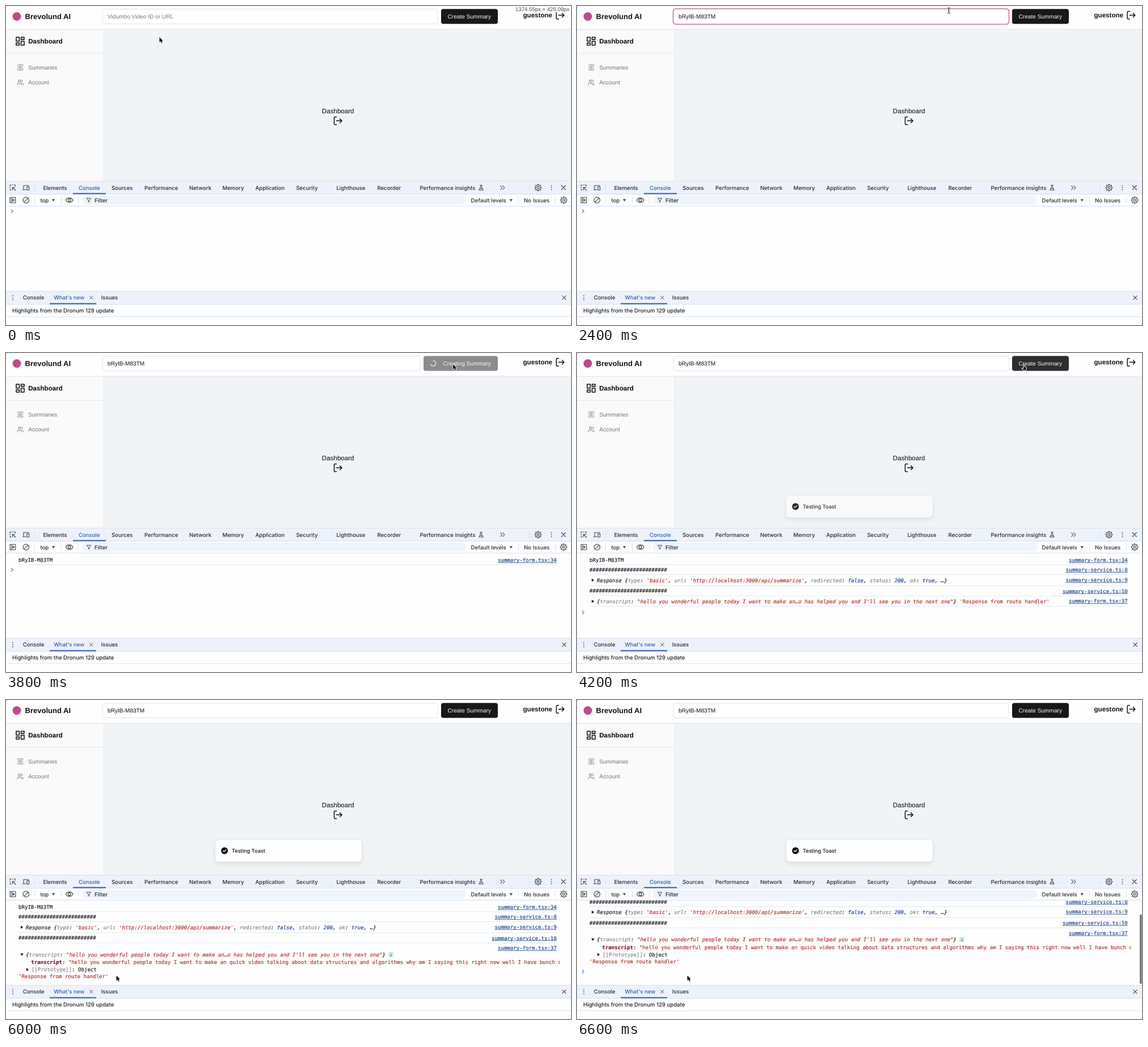
Animation of 996x562 px, one loop 7 s. Source, as an HTML page with a canvas:

```html
<!DOCTYPE html>
<html lang="en">
<head>
<meta charset="utf-8">
<title>Summary dashboard</title>
<style>
html, body { margin: 0; width: 100%; height: 100%; overflow: hidden; background: #fefefe; }
canvas { display: block; width: 996px; height: 562px; }
</style>
</head>
<body>
<canvas id="stage" width="996" height="562"></canvas>
<script>
const ctx = document.getElementById('stage').getContext('2d');
ctx.textRendering = 'geometricPrecision';
const LOOP = 7000, STEP = 200;
const SANS = '"Liberation Sans", Arial, sans-serif';
const UI = 'Inter, sans-serif';
const MONO = '9.085px "DejaVu Sans Mono", monospace';
const INK = '#1f1f1f', ICON = '#45484c', BLUE = '#2a5cc2', RED = '#b8302a', GREY = '#85868a', NUM = '#1f3da8';
const LINK = '#1f4696';
const VIDEO = 'bRyIB-M83TM';

// Event times in ms
const T = { label: 800, focus: 600, paste: 1800, submit: 3000, reply: 3950, expand: 5600, scroll: 6200 };

const clamp = v => Math.max(0, Math.min(1, v));
const smooth = v => v * v * (3 - 2 * v);

function rect(x, y, w, h, color) {
  ctx.fillStyle = color;
  ctx.fillRect(x, y, w, h);
}

function round(x, y, w, h, r, fill, stroke, width = 1) {
  ctx.beginPath();
  ctx.roundRect(x, y, w, h, r);
  if (fill) { ctx.fillStyle = fill; ctx.fill(); }
  if (stroke) { ctx.strokeStyle = stroke; ctx.lineWidth = width; ctx.stroke(); }
}

function text(str, x, y, font, color = INK, align = 'left') {
  ctx.font = font;
  ctx.fillStyle = color;
  ctx.textAlign = align;
  ctx.fillText(str, x, y);
}

// Console text is slightly heavier than the regular weight.
function code(str, x, cy, color, style = '', align = 'left') {
  text(str, x, cy + 3.2, style + ' ' + MONO, color, align);
  ctx.strokeStyle = color;
  ctx.lineWidth = 0.2;
  ctx.strokeText(str, x, cy + 3.2);
}

const ui = (str, x, cy, color = '#27292c') => text(str, x + 0.4, cy + 3.5, '500 9.6px ' + UI, color);

// Draws an SVG path centred on (x, y); the path uses a 24-unit grid.
function icon(path, x, y, scale, color = ICON, weight = 2, filled = false) {
  ctx.save();
  ctx.translate(x - 12 * scale, y - 12 * scale);
  ctx.scale(scale, scale);
  ctx.lineWidth = weight;
  ctx.lineCap = ctx.lineJoin = 'round';
  ctx.strokeStyle = ctx.fillStyle = color;
  const shape = new Path2D(path);
  filled ? ctx.fill(shape) : ctx.stroke(shape);
  ctx.restore();
}

const ring = (x, y, r) => `M${x - r} ${y}a${r} ${r} 0 1 0 ${2 * r} 0a${r} ${r} 0 1 0 ${-2 * r} 0`;
const ICONS = {
  board: 'M3 3h7v9H3zM14 3h7v5h-7zM14 12h7v9h-7zM3 16h7v5H3z',
  view: 'M21 17v2a2 2 0 0 1-2 2H5a2 2 0 0 1-2-2v-2M21 7V5a2 2 0 0 0-2-2H5a2 2 0 0 0-2 2v2M5 12a7.5 7.5 0 0 1 14 0a7.5 7.5 0 0 1-14 0' + ring(12, 12, 1.5),
  users: 'M16 21v-2a4 4 0 0 0-4-4H6a4 4 0 0 0-4 4v2M22 21v-2a4 4 0 0 0-3-3.9M16 3.1a4 4 0 0 1 0 7.8' + ring(9, 7, 4),
  exit: 'M8 2H4a2 2 0 0 0-2 2v16a2 2 0 0 0 2 2h4M8 12h14M17 7l5 5-5 5',
  inspect: 'M3 7V3h3M10 3h2M16 3h4v4M3 11v2M3 17v3h4M21 21l-9-9M11 19v-8h8',
  device: 'M4 17V5h17M1 19h11M15 9h7v11h-7z',
  panel: 'M3 3h18v18H3zM8 3v18M12 8l5 4-5 4z',
  clear: ring(12, 12, 9.5) + 'M18.5 5.5l-13 13',
  eye: 'M1 12C5 3 19 3 23 12C19 21 5 21 1 12' + ring(12, 12, 4),
  funnel: 'M3 4h18l-7 9v7h-4v-7z',
  flask: 'M8 3h8M10 3v7L4 21h16L14 10V3M7 16h10',
  cross: 'M5 5l14 14M19 5L5 19',
  more: 'M4 5l7 7-7 7M13 5l7 7-7 7',
  down: 'M4 6h16l-8 13z',
  right: 'M6 4v16l13-8z',
  check: 'M6 12l4 4 8-8',
  prompt: 'M8 5l7 7-7 7',
  dots: ring(12, 4, 2) + ring(12, 12, 2) + ring(12, 20, 2)
};

function gear(x, y) {
  let path = '';
  for (let i = 0; i < 32; i++) {
    const a = (i - 0.5) * Math.PI / 16, r = i % 4 < 2 ? 11 : 8;
    path += `${i ? 'L' : 'M'}${12 + r * Math.cos(a)} ${12 + r * Math.sin(a)}`;
  }
  icon(path + 'Z' + ring(12, 12, 3.5), x, y, 0.53, ICON, 2.2);
}

function pointerAt(t) {
  const keys = [[0, 270.5, 55], [600, 262, 18], [1400, 262, 18], [2400, 655.5, 8], [2800, 788, 20],
    [4400, 788, 20], [5400, 29.5, 441], [5600, 29.5, 441], [6000, 194.5, 485.5], [LOOP, 194.5, 485.5]];
  const i = keys.findIndex(k => k[0] > t);
  const [t0, x0, y0] = keys[i - 1], [t1, x1, y1] = keys[i];
  const p = smooth((t - t0) / (t1 - t0));
  return { x: x0 + (x1 - x0) * p, y: y0 + (y1 - y0) * p };
}

const inBox = (p, x0, x1) => p.x > x0 && p.x < x1 && p.y > 5 && p.y < 32;

function drawPage(t, mouse, busy) {
  rect(0, 0, 996, 308, '#fefefe');
  rect(173, 41, 823, 267, '#f1f4f6');
  rect(0, 41, 172, 267, '#fafafa');
  rect(172, 41, 1, 267, '#e6e8eb');
  rect(0, 83, 172, 1, '#e6e8eb');
  rect(0, 40, 996, 1, '#eff1f3');
  rect(0, 41, 996, 1, '#e9ebee');

  ctx.beginPath();
  ctx.arc(19, 18.5, 7.5, 0, 7);
  ctx.fillStyle = '#c0488c';
  ctx.fill();
  text('Brevolund AI', 33.5, 22.5, 'bold 13.04px ' + SANS, '#111');
  icon(ICONS.board, 25, 62, 0.78, '#111', 2);
  text('Dashboard', 39.2, 65.8, 'bold 11.6px ' + SANS, '#080808');
  icon(ICONS.view, 25.2, 108.3, 0.52, '#70747b', 1.7);
  icon(ICONS.users, 25.2, 134.5, 0.5, '#70747b', 2);
  text('Summaries', 39.2, 111.8, '10.14px ' + SANS, '#70747b');
  text('Account', 39.2, 137.8, '10.14px ' + SANS, '#70747b');
  text('Dashboard', 585.2, 188.6, '11.6px ' + SANS, '#080808', 'center');
  icon(ICONS.exit, 585.3, 202.3, 0.68, '#111', 2.2);

  const right = busy ? 730 : 761;
  const focused = t >= T.focus && t < T.submit;
  if (focused) round(169.5, 4.8, 592, 27.4, 5, '#fff', '#bd558f', 1.3);
  else round(170, 5.5, right - 170, 26, 4, '#fff', '#e2e4e8');
  if (t < T.paste) text('Vidumbo Video ID or URL', 179, 21.7, '10.14px ' + SANS, '#777b83');
  else text(VIDEO, 179, 21.7, '10.14px ' + SANS, '#111');

  if (busy) {
    round(736, 5.3, 131, 26.3, 4, '#8c8c8d');
    text('Creating Summary', 770.5, 21.7, '10.14px ' + SANS, '#f7f7f7');
    const a = (t - 3200) / 1000 * Math.PI * 2;
    ctx.beginPath();
    ctx.arc(753, 18.3, 4.7, a + 0.9, a + 5.3);
    ctx.strokeStyle = '#f4f4f4';
    ctx.lineWidth = 1.2;
    ctx.stroke();
  } else {
    round(767, 5.3, 100, 26.3, 4, inBox(mouse, 767, 867) ? '#2d2d30' : '#18181a');
    text('Create Summary', 778.5, 21.7, '10.14px ' + SANS, '#f7f7f7');
  }

  text('guestone', 963, 20, 'bold 11.6px ' + SANS, '#111', 'right');
  icon(ICONS.exit, 977, 16.2, 0.68, '#111', 2.2);
  if (t < T.label) {
    rect(897, 0, 99, 11, '#fefefe');
    text('1374.55px × 429.09px', 898, 9, '9.6px ' + SANS, '#4c4c4c');
  } else {
    rect(0, 0, 1, 1, '#777');
  }
}

function drawToast(t) {
  const u = clamp((t - T.reply - 20) / 400);
  const p = 1 - Math.pow(1 - u, 2.4);
  if (!u) return;
  const y = 246.5 + 39 * (1 - p);
  ctx.save();
  ctx.globalAlpha = p;
  ctx.shadowColor = 'rgba(0,0,0,.12)';
  ctx.shadowBlur = 9;
  ctx.shadowOffsetY = 3;
  round(369, y, 258, 38.3, 6, '#fefefe');
  ctx.shadowColor = 'transparent';
  round(369, y, 258, 38.3, 6, null, '#ebedef', 0.8);
  ctx.beginPath();
  ctx.arc(385.2, y + 19, 6, 0, 7);
  ctx.fillStyle = '#080808';
  ctx.fill();
  icon(ICONS.check, 385.2, y + 19, 0.45, '#fff', 3);
  text('Testing Toast', 398, y + 22.6, '500 9.2px ' + UI, '#111');
  ctx.restore();
}

function drawToolbars() {
  rect(0, 308, 996, 24, '#edf2fa');
  rect(0, 308, 996, 1, '#d9e2f1');
  rect(0, 331, 996, 1, '#d3e0f5');
  rect(0, 332, 996, 21, '#fefefe');
  rect(0, 352, 996, 1, '#d3e0f5');
  const tabs = { Elements: 65, Sources: 185.5, Performance: 243.5, Network: 322.5, Memory: 381, Application: 439,
    Security: 511, Lighthouse: 582, Recorder: 654, 'Performance insights': 729 };
  for (const name in tabs) ui(name, tabs[name], 320);
  ui('Console', 127.5, 320, BLUE);
  rect(118, 329.5, 58, 2, BLUE);

  icon(ICONS.inspect, 12, 320, 0.53, ICON, 2.2);
  icon(ICONS.device, 35.3, 320, 0.53, ICON, 2.2);
  icon(ICONS.flask, 837.5, 320, 0.46, ICON, 2.2);
  icon(ICONS.more, 875.3, 320, 0.47, ICON, 2.2);
  gear(938, 320);
  icon(ICONS.dots, 961.5, 320, 0.46, ICON, 1, true);
  icon(ICONS.cross, 982.8, 320, 0.5, ICON, 2.4);

  icon(ICONS.panel, 12, 342, 0.53, ICON, 2.2);
  icon(ICONS.clear, 35.3, 342, 0.55, ICON, 2.2);
  ui('top', 60, 342);
  icon(ICONS.down, 83.5, 342.2, 0.33, ICON, 1, true);
  icon(ICONS.eye, 111.7, 342, 0.58, ICON, 2);
  round(134, 334, 677, 16, 8, '#eff3fa');
  icon(ICONS.funnel, 146, 342, 0.41, ICON, 2.3);
  ui('Filter', 155.5, 342);
  ui('Default levels', 819.2, 342);
  icon(ICONS.down, 890.3, 342.2, 0.33, ICON, 1, true);
  ui('No Issues', 912.7, 342);
  gear(983, 342);

  for (const [x, y] of [[50, 320], [922, 320], [50, 342], [97, 342], [127, 342], [903, 342], [968, 342]])
    rect(x, y - 6, 1, 12, '#d3e0f5');
}

function drawDrawer() {
  rect(0, 502, 996, 60, '#fefefe');
  rect(0, 502, 996, 24, '#edf2fa');
  rect(0, 502, 996, 1, '#d9e2f1');
  rect(0, 525, 996, 1, '#d3e0f5');
  icon(ICONS.dots, 12, 513.8, 0.46, ICON, 1, true);
  ui('Console', 29.3, 513.7);
  ui("What's new", 83.8, 513.7, BLUE);
  rect(77, 523.5, 82, 2, BLUE);
  icon(ICONS.cross, 150.3, 513.8, 0.4, ICON, 2.4);
  ui('Issues', 167.3, 513.7);
  icon(ICONS.cross, 984, 513.8, 0.46, ICON, 2.4);
  ui('Highlights from the Dronum 129 update', 10.7, 536.7, INK);
  rect(0, 547, 996, 1, '#d8e4f8');
}

// Writes coloured pieces one after another: [text, color, font style].
function run(x, cy, pieces) {
  for (const [str, color = INK, style] of pieces) {
    code(str, x, cy, color, style);
    x += ctx.measureText(str).width;
  }
}

const pair = (key, value, color, end = ', ') =>
  [[key, GREY, 'italic'], [': ', INK, 'italic'], [value, color, 'italic'], [end, INK, 'italic']];

function link(str, cy) {
  code(str, 970.8, cy, LINK, '', 'right');
  const w = ctx.measureText(str).width;
  rect(970.8 - w, cy + 4.2, w, 0.8, LINK);
}

const rule = y => rect(22, y, 950, 1, '#e0e9f7');
const prompt = y => icon(ICONS.prompt, 11, y, 0.42, '#3b72d9', 2.6);

function drawConsole(t) {
  const open = t >= T.expand;
  const scroll = t < T.scroll ? 0 : t < 6400 ? 6.5 : t < 6600 ? 20 : 26.5;
  rect(0, 353, 996, 149, '#fefefe');
  ctx.save();
  ctx.beginPath();
  ctx.rect(0, 353, 996, 149);
  ctx.clip();
  ctx.translate(0, -scroll);

  if (t < T.submit) {
    prompt(361.5);
  } else {
    run(22, 364.7, [[VIDEO]]);
    link('summary-form.tsx:34', 364.7);
    rule(372.5);
    if (t < T.reply) prompt(382);
    else drawReply(t, open);
  }
  ctx.restore();
  if (t >= T.scroll) round(992, 355.8 + scroll * 0.82, 3.8, 122.5, 1.9, '#7b7b7b');
}

function drawReply(t, open) {
  const hashes = '#'.repeat(25);
  run(22, 382, [[hashes]]);
  link('summary-service.ts:8', 382);
  rule(390);

  icon(ICONS.right, 28, 400.3, 0.34, INK, 1, true);
  run(35, 400.5, [['Response {', INK, 'italic'],
    ...pair('type', "'basic'", RED),
    ...pair('url', "'http://localhost:3000/api/summarize'", RED),
    ...pair('redirected', 'false', NUM),
    ...pair('status', '200', NUM),
    ...pair('ok', 'true', NUM, ', …}')]);
  link('summary-service.ts:9', 399.7);
  rule(409.5);

  run(22, 419, [[hashes]]);
  link('summary-service.ts:10', 419.3);
  rule(427.5);

  const y = open ? 448.5 : 437.5;
  const message = "'Response from route handler'";
  if (!open && t >= 5400) rect(0, 431.5, 669, 12.5, '#f0f0f0');
  icon(open ? ICONS.down : ICONS.right, 28, y, 0.34, INK, 1, true);
  run(35, y, [['{', INK, 'italic'],
    ...pair('transcript', "\"hello you wonderful people today I want to make an…o has helped you and I'll see you in the next one\"", RED, '}'),
    [open ? '' : ' ' + message, RED]]);
  link('summary-form.tsx:37', 437);

  if (!open) {
    rule(445.5);
    prompt(457);
    return;
  }
  round(674, 444, 9, 9, 2, '#d3e3fd');
  text('i', 678.5, 451.7, 'italic bold 8px "Liberation Serif", serif', BLUE, 'center');
  ctx.save();
  ctx.beginPath();
  ctx.rect(0, 353, 976.5, 200);
  ctx.clip();
  run(44.3, 462, [['transcript', '#8a1528', 'bold'], [': '],
    ['"hello you wonderful people today I want to make an quick video talking about data structures and algorithms why am I saying this right now well I have bunch of', RED]]);
  ctx.restore();
  icon(ICONS.right, 38, 475, 0.34, INK, 1, true);
  run(45, 475, [['[[Prototype]]', GREY], [': Object']]);
  run(22, 487.2, [[message, RED]]);
  prompt(505);
}

function drawPointer({ x, y }, busy) {
  ctx.save();
  ctx.translate(x, y);
  ctx.lineJoin = 'round';
  if (inBox({ x, y }, 170, busy ? 730 : 761)) {
    const beam = new Path2D('M-2.5-5Q0-5 0-3.5Q0-5 2.5-5M0-3.5V3.5M-2.5 5Q0 5 0 3.5Q0 5 2.5 5M-1 1h2');
    ctx.strokeStyle = '#222';
    ctx.lineWidth = 1;
    ctx.stroke(beam);
  } else if (!busy && inBox({ x, y }, 767, 867)) {
    const hand = new Path2D('M-1 .5Q0-.7 1 .5V4Q4 4 4.5 6Q4.6 9 3 11H-1.5L-4 7Q-3.6 5.6-1 7.5Z');
    ctx.fillStyle = '#111';
    ctx.strokeStyle = '#fff';
    ctx.lineWidth = 1;
    ctx.fill(hand);
    ctx.stroke(hand);
  } else {
    const arrow = new Path2D('M0 0V9L2.1 7.1L3.7 10.5L5.3 9.8L3.8 6.5H6.4Z');
    ctx.strokeStyle = '#fff';
    ctx.lineWidth = 1.4;
    ctx.stroke(arrow);
    ctx.fillStyle = '#0a0a0a';
    ctx.fill(arrow);
  }
  ctx.restore();
}

function draw(t) {
  const mouse = pointerAt(t);
  const busy = t >= T.submit && t < T.reply;
  drawPage(t, mouse, busy);
  drawToast(t);
  drawConsole(t);
  drawToolbars();
  drawDrawer();
  drawPointer(mouse, busy);
}

const start = performance.now();
function tick() {
  const t = (performance.now() - start) % LOOP;
  draw(Math.floor(t / STEP) * STEP);
  requestAnimationFrame(tick);
}
tick();
</script>
</body>
</html>
```
